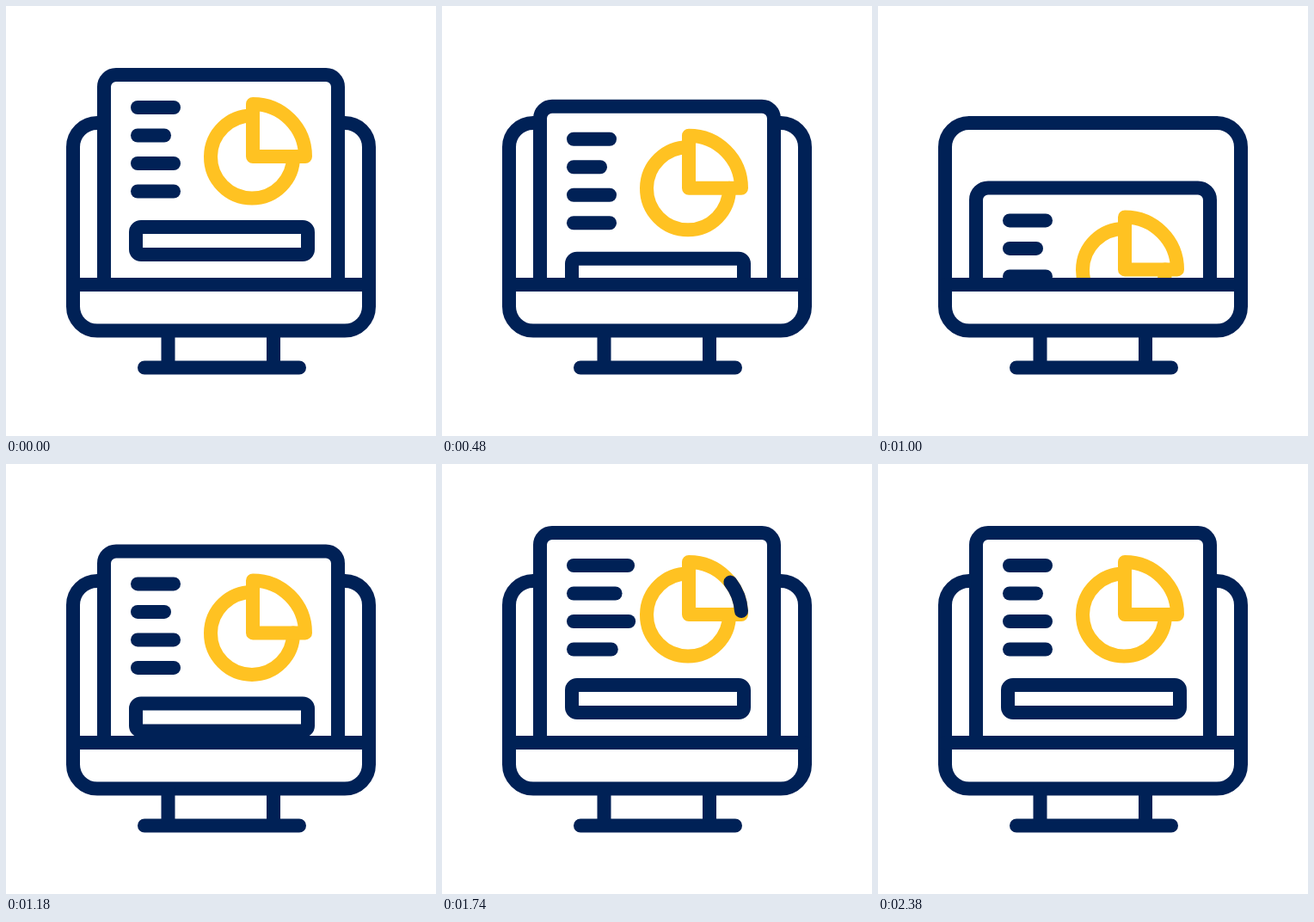
An HTML page that plays this animation: 500x500 px, repeating every 2.7 s.

```html
<!DOCTYPE html>
<html lang="en">
<head>
<meta charset="utf-8">
<title>Report on a monitor</title>
<style>
  html, body { margin: 0; height: 100%; overflow: hidden; background: #fff; }
  svg { display: block; width: 100%; height: 100%; }
  path, rect, circle { fill: none; stroke: #002156; stroke-width: 16; stroke-linecap: round; stroke-linejoin: round; }
  .gold { stroke: #ffc222; }
  .sheet { fill: #fff; }
</style>
</head>
<body>
<svg viewBox="0 0 500 500">
  <clipPath id="slot"><path d="M0 0H500V324H0Z"/></clipPath>
  <rect x="78" y="136" width="344" height="241.500" rx="28"/>
  <path d="M188.500 378V420M311 378V420M161 420.500H341"/>
  <g id="streaks"></g>
  <g clip-path="url(#slot)">
    <g id="paper">
      <path class="sheet" d="M114 324V94a14 14 0 0 1 14-14H372a14 14 0 0 1 14 14V324Z"/>
      <g id="bars"></g>
      <rect x="151" y="257" width="200" height="32" rx="6"/>
      <path class="gold" d="M287 127.500A48 48 0 1 0 334 175"/>
      <path class="gold" d="M287 175V114A61 61 0 0 1 348 175Z"/>
      <g id="highlight"></g>
    </g>
  </g>
  <path d="M78 324H422"/>
  <g id="sparks"></g>
</svg>
<script>
const LOOP = 2700;
const byId = id => document.getElementById(id);
const clamp = x => Math.min(1, Math.max(0, x));
const ease = x => (1 - Math.cos(Math.PI * clamp(x))) / 2;

function addPath(parent, d, className = '') {
  const path = document.createElementNS('http://www.w3.org/2000/svg', 'path');
  path.setAttribute('d', d);
  path.setAttribute('class', className);
  byId(parent).append(path);
  return path;
}

// Strokes that run along their path: the head leads, the tail follows.
const runners = [
  ['streaks', 'M201 165V240', 576, 320, 'gold'],
  ['streaks', 'M254 165L253 280', 553, 320, 'gold'],
  ['sparks', 'M396.500 74V50', 1347, 330, 'gold'],
  ['sparks', 'M427 91.500L448 54', 1319, 330, 'gold'],
  ['sparks', 'M454 113.500L476 102', 1347, 330, 'gold'],
  ['highlight', 'M348 171A61 61 0 0 0 291 114', 1592, 560, '']
].map(([parent, d, start, length, className]) => {
  const path = addPath(parent, d, className);
  path.setAttribute('pathLength', 100);
  return { path, start, length };
});

const bars = [
  { y: 118, end: 195, start: 1500 },
  { y: 150.5, end: 184, start: 1560 },
  { y: 183, end: 195, start: 1470 },
  { y: 215.5, end: 195, start: 1725 }
].map(bar => ({ ...bar, path: addPath('bars', '') }));

// Paper offset: [time, y]
const keys = [[185, 0], [360, -32], [728, 250], [735, 250], [1285, 0], [1390, 4.3], [1500, 0]];

function paperY(t) {
  let y = 0;
  for (let i = 1; i < keys.length; i++) {
    const [t0, y0] = keys[i - 1], [t1, y1] = keys[i];
    y += (y1 - y0) * ease((t - t0) / (t1 - t0));
  }
  return y;
}

function draw(t) {
  byId('paper').setAttribute('transform', `translate(0 ${paperY(t)})`);
  for (const { path, start, length } of runners) {
    const p = (t - start) / length;
    const head = 100 * ease(p / 0.6), tail = 100 * ease((p - 0.4) / 0.6);
    path.style.display = p > 0 && p < 1 ? '' : 'none';
    path.setAttribute('stroke-dasharray', `${Math.max(0.01, head - tail)} 300`);
    path.setAttribute('stroke-dashoffset', -tail);
  }
  for (const { path, y, end, start } of bars) {
    const stretch = 23 * Math.sin(Math.PI * clamp((t - start) / 655));
    path.setAttribute('d', `M153 ${y}H${end + stretch}`);
  }
}

function frame() {
  draw(performance.now() % LOOP);
  requestAnimationFrame(frame);
}
frame();
</script>
</body>
</html>
```
